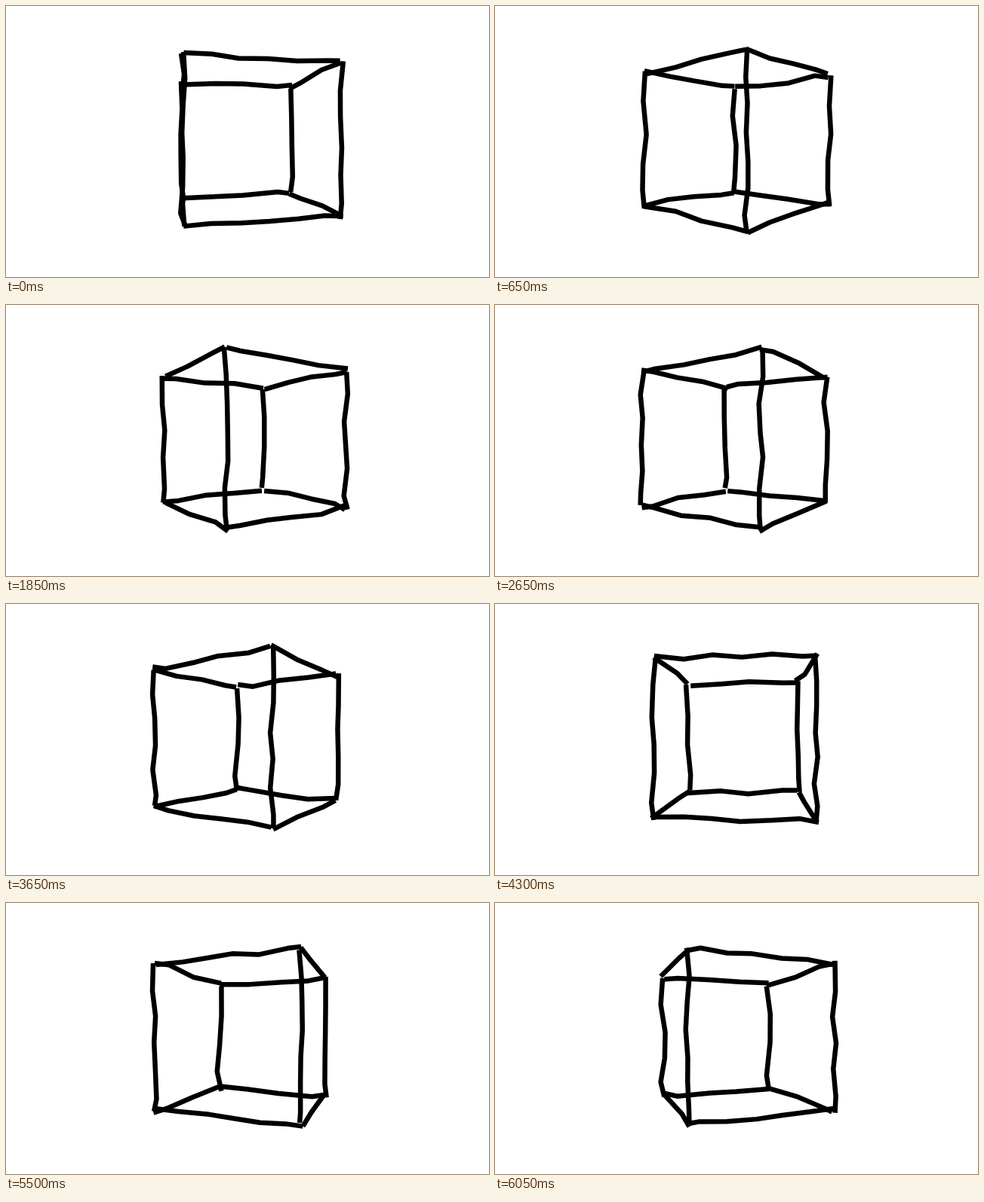
Recreate the animation shown at these times as an HTML page with a canvas. Size 640 px wide and 360 px high, loop 6100 ms.

```html
<!DOCTYPE html>
<html lang="en">
<head>
<meta charset="utf-8">
<title>Sketched cube</title>
<style>
html, body { margin: 0; width: 100%; height: 100%; overflow: hidden; background: #fff; }
canvas { display: block; }
</style>
</head>
<body>
<canvas id="stage" width="640" height="360"></canvas>
<script>
const ctx = document.getElementById('stage').getContext('2d');
const LOOP = 6100, STEP = 50;
const CX = 323, CY = 177.5, FOCAL = 434, DISTANCE = 5;
const WOBBLE = 3.2, SEGMENT = 36.4;
const SIDES = [[0, 1], [1, 2], [3, 2], [0, 3]];

// [time in ms, angle of the first corner in degrees]
const TURN = [[0, -33.5], [1250, -135.8], [1850, -190.5], [2650, -260],
  [3650, -350], [4950, -467.4], [6050, -564], [6100, -568.4]];

function angleAt(t) {
  const i = TURN.findIndex(key => key[0] > t);
  const [t0, a0] = TURN[i - 1], [t1, a1] = TURN[i];
  return a0 + (a1 - a0) * (t - t0) / (t1 - t0);
}

function seeded(seed) {
  return () => {
    seed = seed + 0x6D2B79F5 | 0;
    let n = Math.imul(seed ^ seed >>> 15, 1 | seed);
    n = n + Math.imul(n ^ n >>> 7, 61 | n) ^ n;
    return ((n ^ n >>> 14) >>> 0) / 4294967296;
  };
}

function corner(degrees, side) {
  const a = degrees * Math.PI / 180;
  const scale = FOCAL / (DISTANCE - Math.SQRT2 * Math.cos(a));
  return [CX + Math.SQRT2 * Math.sin(a) * scale, CY + side * scale];
}

// Even strokes from the first point, then a half stroke to the last.
function sketchLine([x0, y0], [x1, y1], random) {
  const jitter = () => (random() * 2 - 1) * WOBBLE;
  const n = Math.round(Math.hypot(x1 - x0, y1 - y0) / SEGMENT - 0.5);
  ctx.beginPath();
  for (let i = 0; i <= n + 1; i++) {
    const k = Math.min(1, i / (n + 0.5));
    ctx.lineTo(x0 + (x1 - x0) * k + jitter(), y0 + (y1 - y0) * k + jitter());
  }
  ctx.stroke();
}

function draw(frame) {
  const random = seeded(frame * 7919 + 17);
  const angle = angleAt(frame * STEP);
  const at = (i, side) => corner(angle + i * 90, side);
  ctx.fillStyle = '#fff';
  ctx.fillRect(0, 0, 640, 360);
  ctx.strokeStyle = '#000';
  ctx.lineWidth = 6.5;
  ctx.lineJoin = 'bevel';
  for (const [from, to] of SIDES) {
    sketchLine(at(from, -1), at(to, -1), random);
    sketchLine(at(from, 1), at(to, 1), random);
  }
  for (let i = 0; i < 4; i++) sketchLine(at(i, -1), at(i, 1), random);
}

const start = performance.now();
function tick() {
  draw(Math.floor((performance.now() - start) % LOOP / STEP));
  requestAnimationFrame(tick);
}
tick();
</script>
</body>
</html>
```
